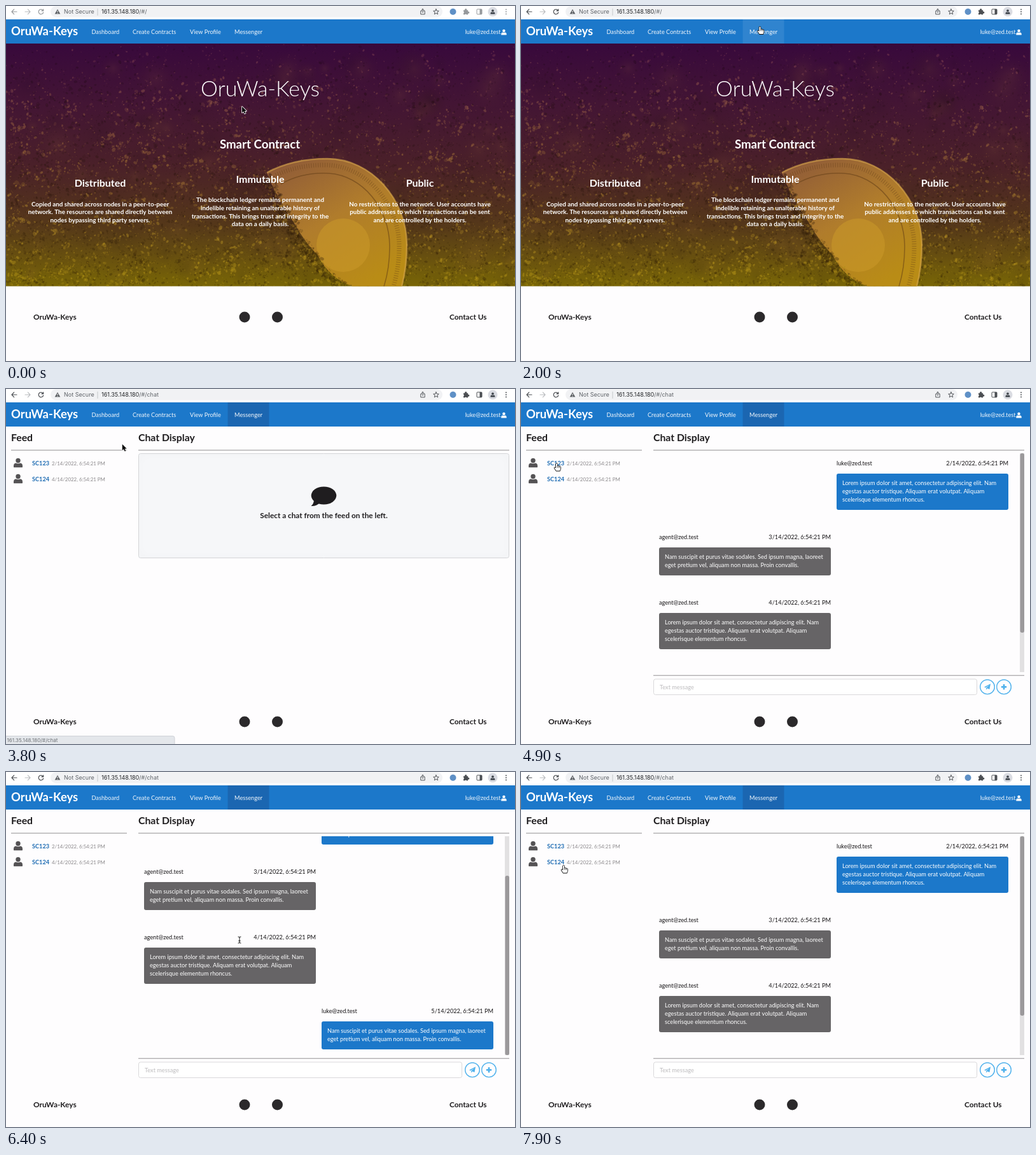
An HTML page with a canvas that plays this animation: 800x558 px, repeating every 8000 ms.

```html
<!DOCTYPE html>
<html lang="en">
<head>
<meta charset="utf-8">
<title>Rental messenger</title>
<style>
  html, body { margin: 0; width: 100%; height: 100%; overflow: hidden; background: #fefdfe; }
  canvas { display: block; width: 800px; height: 558px; }
</style>
</head>
<body>
<canvas id="stage"></canvas>
<script>
const W = 800, H = 558, LOOP = 8000;
const dpr = window.devicePixelRatio || 1;
const BRAND = 'OruWa-Keys', USER = 'luke@zed.test', AGENT = 'agent@zed.test';
const BLUE = '#1c78ca', INK = '#1f1d1f', PAGE = '#fefdfe';
const LATO = 'Lato, "Open Sans", sans-serif', UI = 'Inter, Roboto, sans-serif';
const TIMES = { focus: 500, hover: 1700, page: 2300, leave: 3500, chat: 4400 };
const TOP = 59, BOTTOM = 440.6;

function makeCanvas(el) {
  el.width = W * dpr;
  el.height = H * dpr;
  const c = el.getContext('2d');
  c.scale(dpr, dpr);
  return c;
}
const stage = document.getElementById('stage');
const g = makeCanvas(stage);

// ---------- helpers ----------
const clamp = v => Math.max(0, Math.min(1, v));
const ease = v => { v = clamp(v); return v * v * (3 - 2 * v); };
const ramp = (t, a, b) => ease((t - a) / (b - a));

function text(s, x, y, size, color = INK, weight = 400, align = 'left', family = LATO) {
  g.font = `${weight} ${size}px ${family}`;
  g.fillStyle = color;
  g.textAlign = align;
  g.fillText(s, x, y);
}
function rect(x, y, w, h, color, c = g) {
  c.fillStyle = color;
  c.fillRect(x, y, w, h);
}
function round(x, y, w, h, r, fill, line) {
  g.beginPath();
  g.roundRect(x, y, w, h, r);
  if (fill) { g.fillStyle = fill; g.fill(); }
  if (line) { g.strokeStyle = line; g.lineWidth = 1; g.stroke(); }
}
function disc(x, y, r, color, c = g) {
  c.fillStyle = color;
  c.beginPath();
  c.arc(x, y, r, 0, 7);
  c.fill();
}
// Draws an SVG path at a place, filled and/or outlined.
function shape(d, x, y, fill, line, width = 1.2, scale = 1) {
  const p = new Path2D(d);
  g.save();
  g.translate(x, y);
  g.scale(scale, scale);
  g.lineWidth = width;
  g.lineJoin = g.lineCap = 'round';
  if (line) { g.strokeStyle = line; g.stroke(p); }
  if (fill) { g.fillStyle = fill; g.fill(p); }
  g.restore();
}
function person(x, y, s, color) {
  disc(x, y - 3.3 * s, 3.7 * s, color);
  shape('M-7 7V5Q-7 1 -3.4 .8Q0 2.2 3.4 .8Q7 1 7 5V7Q7 7.4 6.4 7.4H-6.4Q-7 7.4 -7 7Z', x, y, color, null, 1, s);
}

// ---------- hero picture, drawn once ----------
function paintHero() {
  const el = document.createElement('canvas'), c = makeCanvas(el);
  const span = BOTTOM - TOP;
  let seed = 77;
  const rnd = () => {
    seed = (seed * 1664525 + 1013904223) >>> 0;
    return seed / 4294967296;
  };
  const fade = (x0, y0, x1, y1, ...cols) => {
    const f = c.createLinearGradient(x0, y0, x1, y1);
    cols.forEach((col, i) => f.addColorStop(i / (cols.length - 1), col));
    return f;
  };
  c.beginPath();
  c.rect(0, TOP, W, span);
  c.clip();
  rect(0, TOP, W, span + 1, fade(0, TOP, 0, BOTTOM, '#38093c', '#431534', '#4a2029', '#553819', '#796606'), c);

  // One fleck of soil: rosy near the top, golden near the bottom.
  const grain = (x, y, lit, big = 1) => {
    const d = (y - TOP) / span, r = (.4 + rnd() * rnd() * 1.9) * big;
    c.globalAlpha = lit ? .15 + rnd() * .4 : .12 + rnd() * .25;
    c.fillStyle = lit ? `rgb(${130 + 50 * d},${65 + 85 * d},${85 - 65 * d})`
                      : `rgb(${30 + 22 * d},${5 + 30 * d},${24 - 20 * d})`;
    c.beginPath();
    c.ellipse(x, y, r * 1.4, r, rnd() * 3, 0, 7);
    c.fill();
  };
  for (let i = 0; i < 130; i++) {
    const x = rnd() * W, y = 90 + rnd() * 350, r = 10 + rnd() * 30;
    c.globalAlpha = .1;
    const f = c.createRadialGradient(x, y, 0, x, y, r);
    f.addColorStop(0, rnd() < .6 ? '#140610' : '#a8743c');
    f.addColorStop(1, 'rgba(60,30,20,0)');
    disc(x, y, r, f, c);
  }
  for (let i = 0; i < 9000; i++) {
    const y = TOP + span * Math.pow(rnd(), .7);
    grain(rnd() * W, y, rnd() < .4);
  }
  // Clumps, thicker towards the lower left.
  for (let i = 0; i < 420; i++) {
    const x = W * Math.pow(rnd(), 1.35), y = TOP + span * (.15 + .85 * Math.pow(rnd(), .75));
    const lit = rnd() < .6;
    for (let n = 0; n < 7; n++) grain(x + (rnd() - .5) * 16, y + (rnd() - .5) * 8, lit, 1.25);
  }

  c.globalAlpha = 1;
  const rim = 'M410 262Q450 240 505 240C575 240 630 305 630 375Q630 410 622 441';
  c.fillStyle = fade(440, 240, 560, 440, '#8f5b38', '#b07c2c', '#b98c16');
  c.fill(new Path2D(rim + 'H545Q508 428 490 392Q470 372 452 340Q424 300 410 262Z'));
  c.lineWidth = 7;
  c.setLineDash([1.2, 2.4]);
  c.strokeStyle = 'rgba(95,58,20,.35)';
  c.stroke(new Path2D('M424 266Q460 249 505 250C567 252 617 312 618 376Q618 410 609 441'));
  c.setLineDash([]);
  c.lineWidth = 2.4;
  c.strokeStyle = 'rgba(222,172,78,.6)';
  c.stroke(new Path2D(rim));
  c.lineWidth = 1.6;
  c.strokeStyle = 'rgba(95,58,20,.5)';
  c.stroke(new Path2D('M432 280Q465 261 507 263C560 266 603 318 603 378Q603 412 594 441'));
  disc(530, 376, 42, 'rgba(205,156,42,.5)', c);
  for (let i = 0; i < 900; i++) {
    const k = rnd();
    grain(408 + 96 * k + 30 * k ** 6 + rnd() * 12 - rnd() * 22, 264 + 176 * k, rnd() < .25, 1.3);
  }
  return el;
}
const hero = paintHero();

// ---------- browser bar ----------
function browserBar(t) {
  const on = t >= TIMES.focus, ink = on ? '#4b4e52' : '#96999c';
  rect(0, 0, W, 21, '#fff');
  round(70, .5, 616, 17, 8.5, '#f1f2f4');
  shape('M4 0H-4M-.3 -3.8L-4 0L-.3 3.8', 13, 9, null, ink, 1.2);
  shape('M-4 0H4M.3 -3.8L4 0L.3 3.8', 34, 9, null, '#b9bbbe', 1.1);
  shape('M3.2 -2A3.8 3.8 0 1 0 3.7 1M3.7 -4V-1.4H1', 55, 9, null, ink, 1.2);
  shape('M0 -4L4.3 3.6H-4.3Z', 81, 9, '#5b5e62');
  rect(80.5, 7.5, 1, 2.6, '#fff');
  rect(80.5, 11, 1, 1, '#fff');
  text('Not Secure', 91, 12.4, 9, '#5f6368', 400, 'left', UI);
  rect(143.5, 4, 1, 11, '#c6c8ca');
  const host = '161.35.148.180';
  text(host, 150, 12.4, 9, '#242629', 400, 'left', UI);
  const hw = g.measureText(host).width;
  text(t >= TIMES.page ? '/#/chat' : '/#/', 150 + hw, 12.4, 9, '#5f6368', 400, 'left', UI);

  shape('M-1.4 -1.3H-3.2V4H3.2V-1.3H1.4M0 1.5V-4.4M-1.8 -2.7L0 -4.5L1.8 -2.7', 655, 9, null, '#55585c', 1);
  shape('M0 -4.2L1.2 -1.3L4.3 -1.1L1.9 .9L2.7 4L0 2.3L-2.7 4L-1.9 .9L-4.3 -1.1L-1.2 -1.3Z', 676, 9, null, '#55585c', 1);
  disc(702.5, 9, 5, '#5f90c6');
  shape('M-4 -2.6H-1.7A1.5 1.5 0 1 1 1.1 -2.6H3.2V-.2A1.5 1.5 0 1 1 3.2 2.5V4.5H.8A1.5 1.5 0 0 0 -1.9 4.5H-4V2.2A1.4 1.4 0 0 0 -4 -.4Z', 723, 9, ink);
  round(740, 5, 8, 8, 1, null, ink);
  rect(744.5, 5, 3.5, 8, ink);
  disc(765, 9, 7.5, '#dadce2');
  person(765, 9, .5, '#444950');
  for (const y of [5.5, 9, 12.5]) disc(786, y, .95, ink);
}

// ---------- page parts ----------
function navBar(t) {
  const y = 21, h = TOP - y;
  rect(0, y, W, h, BLUE);
  const hover = ramp(t, TIMES.hover - 100, TIMES.hover + 50);
  if (t >= TIMES.page) rect(348.5, y, 65, h, '#1b66b1');
  else if (hover) rect(348.5, y, 65, h, `rgba(255,255,255,${.09 * hover})`);
  text(BRAND, 8, 46, 18.5, '#fff', 700);
  const items = { 'Dashboard': 134.5, 'Create Contracts': 199, 'View Profile': 289, 'Messenger': 359 };
  for (const k in items) text(k, items[k], 44, 9.2, '#f4f8fc');
  text(USER, 777.5, 44, 9.2, '#f4f8fc', 400, 'right');
  person(782.5, 41, .6, '#fff');
}
function footer(y) {
  text(BRAND, 43, y + 4, 11.9, INK, 700);
  disc(375, y, 8.5, '#2b292b');
  disc(426.5, y, 8.5, '#2b292b');
  text('Contact Us', 755.5, y + 4, 11.9, INK, 700, 'right');
}
function column(x, y, title, lines) {
  text(title, x, y, 16, '#fff', 700, 'center');
  lines.forEach((s, i) => text(s, x, y + 30.6 + i * 12.6, 9.86, '#fff', 700, 'center'));
}
function homePage() {
  g.drawImage(hero, 0, 0, W, H);
  text(BRAND, 399.5, 142, 34, '#fff', 300, 'center');
  text('Smart Contract', 399, 223.5, 18.7, '#fff', 700, 'center');
  column(148, 284, 'Distributed', [
    'Copied and shared across nodes in a peer-to-peer',
    'network. The resources are shared directly between',
    'nodes bypassing third party servers.']);
  column(399.5, 277.7, 'Immutable', [
    'The blockchain ledger remains permanent and',
    'indelible retaining an unalterable history of',
    'transactions. This brings trust and integrity to the',
    'data on a daily basis.']);
  column(650.5, 284, 'Public', [
    'No restrictions to the network. User accounts have',
    'public addresses to which transactions can be sent',
    'and are controlled by the holders.']);
  footer(489);
}

const LOREM = ['Lorem ipsum dolor sit amet, consectetur adipiscing elit. Nam',
  'egestas auctor tristique. Aliquam erat volutpat. Aliquam', 'scelerisque elementum rhoncus.'];
const NAM = ['Nam suscipit et purus vitae sodales. Sed ipsum magna, laoreet',
  'eget pretium vel, aliquam non massa. Proin convallis.'];
const stamp = month => month + '/14/2022, 6:54:21 PM';

function message(y, mine, month, lines) {
  const x = mine ? 496 : 217;
  text(mine ? USER : AGENT, x, y + 3.4, 9.2, '#141214');
  text(stamp(month), x + 270, y + 3.4, 9.2, '#141214', 400, 'right');
  round(x, y + 16, 270, 18 + lines.length * 13, 3, mine ? BLUE : '#666466');
  lines.forEach((s, i) => text(s, x + 9, y + 34.4 + i * 13, 9.2, '#fff'));
}

// Fraction scrolled: down to the end, a pause, and back up.
const scrolled = t => ramp(t, 5600, 6180) - ramp(t, 6900, 7342);

function chatPane(t) {
  g.save();
  g.beginPath();
  g.rect(200, 101, 600, 344);
  g.clip();
  g.translate(0, -76 * scrolled(t));
  message(117, true, 2, LOREM);
  message(233, false, 3, NAM);
  message(336, false, 4, LOREM);
  message(452, true, 5, NAM);
  g.restore();
  rect(784, 101, 7, 344, '#e2e1e2');
  round(784.5, 101 + 62 * scrolled(t - 20), 6.5, 282, 3, '#9b999b');

  rect(208, 449.6, 583, 1.4, '#b1afb1');
  round(208.5, 456, 508, 24.5, 3, '#fff', '#dad9db');
  text('Text message', 218, 471.8, 9.2, '#bdbcbe');
  const sky = '#4fb1ec';
  for (const x of [733, 759]) {
    g.beginPath();
    g.arc(x, 468.3, 11.3, 0, 7);
    g.strokeStyle = sky;
    g.lineWidth = 1.4;
    g.stroke();
  }
  shape('M5 -5L3.4 3.8L-.3 2.3L-1.9 4.6V1.6L3 -3L-2.8 1.2L-5 .3Z', 733, 468.3, sky);
  rect(754.8, 467, 8.4, 2.6, sky);
  rect(757.7, 464.1, 2.6, 8.4, sky);
}
function emptyPane() {
  round(208.5, 101.5, 582, 164, 3, '#f6f7f9', '#d5d6d9');
  g.save();
  g.clip();
  g.shadowColor = 'rgba(40,50,70,.14)';
  g.shadowBlur = 14 * dpr;
  round(207.5, 100.5, 584, 166, 3, null, '#d5d6d9');
  g.restore();
  g.fillStyle = INK;
  g.beginPath();
  g.ellipse(499.5, 167.5, 19.8, 14, 0, 0, 7);
  g.fill();
  shape('M484 174Q484 180 479.5 184Q488 184.5 493 179Z', 0, 0, INK);
  text('Select a chat from the feed on the left.', 499.5, 203, 11.8, INK, 700, 'center');
}
function chatPage(t) {
  text('Feed', 8, 82, 15.8, INK, 700);
  text('Chat Display', 208, 82, 15.8, INK, 700);
  rect(8, 95.5, 182, 1.4, '#b1afb1');
  rect(208, 95.5, 583, 1.4, '#b1afb1');
  [['SC123', 2, 117], ['SC124', 4, 142]].forEach(([id, month, y]) => {
    person(19, y - 1.2, 1, '#555355');
    text(id, 41, y + 3.4, 9.2, '#1e6cb3', 700);
    text(stamp(month), 72, y + 3.2, 7.9, '#8a888a');
  });
  if (t >= TIMES.chat) chatPane(t); else emptyPane();
  footer(523);

  const a = ramp(t, TIMES.page - 100, TIMES.page + 200) - ramp(t, TIMES.leave + 200, TIMES.leave + 500);
  if (a > 0) {
    g.globalAlpha = a;
    round(-3, 545.5, 268, 16, 3, '#dce0e6', '#c3c7cc');
    text('161.35.148.180/#/chat', 1.5, 555, 8, '#45494e', 400, 'left', UI);
    g.globalAlpha = 1;
  }
}

// ---------- pointer ----------
const STOPS = [ // start, end, x, y
  [0, 0, 371, 158], [900, 1700, 375.5, 32.5], [2050, 2300, 378, 40],
  [3400, 4100, 56, 117], [5000, 5450, 367, 263], [7320, 7750, 67, 147]];
const ARROW = 'M0 0V9.8L2.3 7.7L3.9 11.3L5.6 10.5L4 7.1H7Z';
const HAND = 'M-1 1Q-1 0 0 0Q1 0 1 1V4.2Q2.2 3.6 2.8 4.5Q4 4 4.5 5Q6 4.7 6 6V8.5L5 11.6H-.6L-3.3 7.5Q-3.8 6.2 -2.6 6.2L-1 7.5Z';
const BEAM = 'M-2 -5Q0 -5 0 -4Q0 -5 2 -5M0 -4V4M-2 5Q0 5 0 4Q0 5 2 5M-1.2 1.5H1.2';

function pointer(t) {
  let [, , x, y] = STOPS[0];
  for (const [a, b, nx, ny] of STOPS.slice(1)) {
    const k = ramp(t, a, b);
    x += (nx - x) * k;
    y += (ny - y) * k;
  }
  const overNav = y > 22 && y < 59 && x > 348 && x < 414;
  const overFeed = t >= TIMES.page && x > 40 && x < 69 && y > 111 && y < 152;
  if (overNav || overFeed) {
    shape(HAND, x, y, '#fff', '#111', 1.6);
    shape('M1 4.2V6.5M2.8 4.7V6.5M4.5 5.2V6.7', x, y, null, '#111', .6);
  } else if (t >= 5450 && t < 6950) {
    shape(BEAM, x, y + 1, null, '#fff', 2.4);
    shape(BEAM, x, y + 1, null, '#111', 1);
  } else {
    shape(ARROW, x, y, '#0b0b0b', '#fff', 1.6);
  }
}

function draw() {
  const t = Math.floor((performance.now() % LOOP) / 100) * 100;
  rect(0, 0, W, H, PAGE);
  if (t >= TIMES.page) chatPage(t); else homePage();
  navBar(t);
  browserBar(t);
  pointer(t);
  requestAnimationFrame(draw);
}
draw();
</script>
</body>
</html>
```
